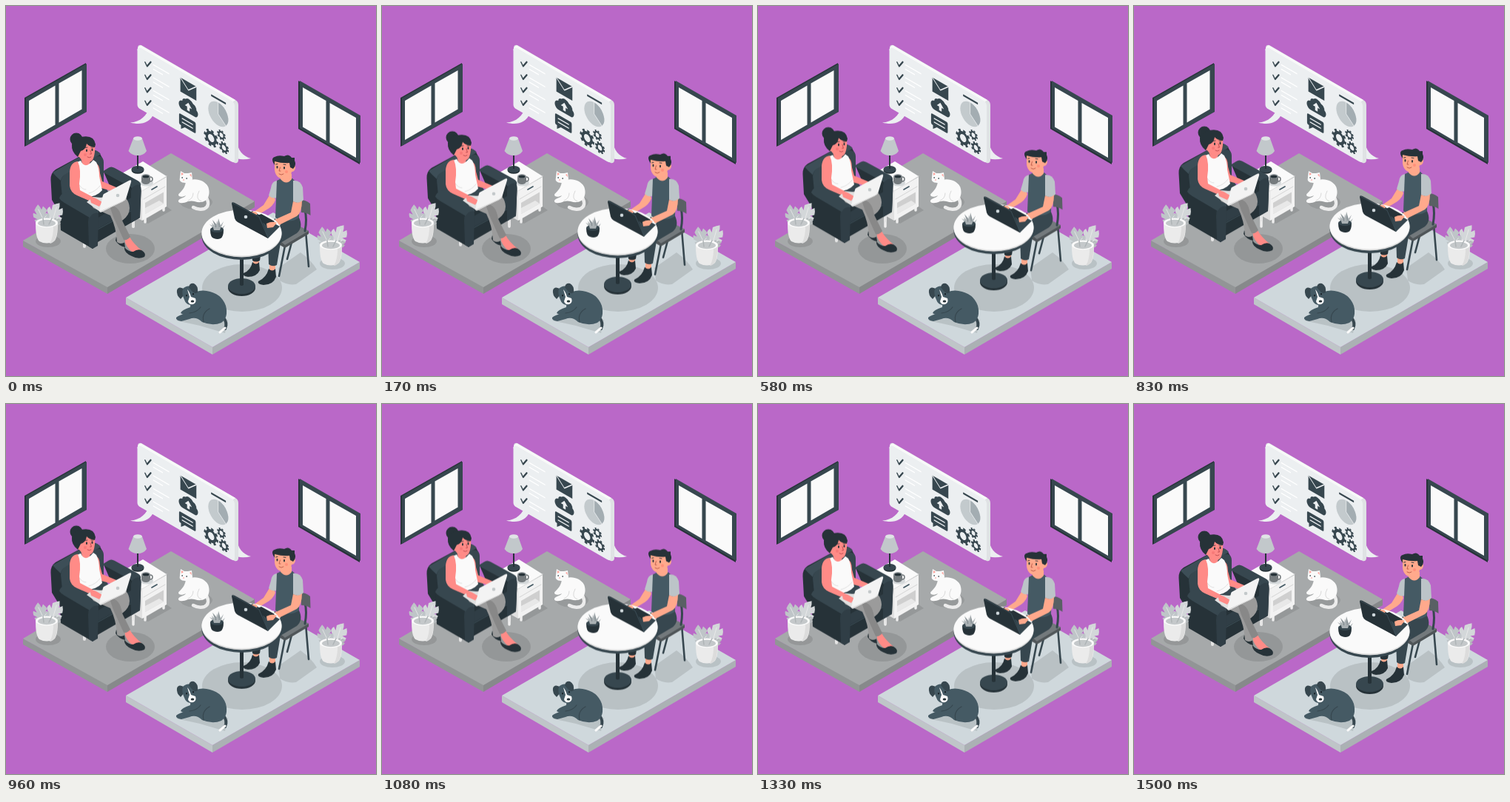
These frames come from a looping animation (500x500 px, 1540 ms). An HTML page without scripts:

```html
<!DOCTYPE html>
<html lang="en">
<head>
<meta charset="utf-8">
<title>Working from home</title>
<style>
html, body { margin: 0; width: 100%; height: 100%; overflow: hidden; background: #ba68c8; }
svg { display: block; width: 100vw; height: 100vh; }
.float { animation: float 1.54s linear infinite; }
/* 1.5 s up and down, then a 40 ms rest */
@keyframes float {
  0%, 97.4%, 100% { transform: none; }
  48.7% { transform: translateY(-10px); }
}
.ink { fill: #263238; }
.dark { fill: #37474f; }
.slate { fill: #455a64; }
.white { fill: #fafafa; }
.pale { fill: #ebebeb; }
.grey { fill: #e0e0e0; }
.panel { fill: #eceff1; }
.rose { fill: #ff8b87; }
.peach { fill: #ffa98c; }
.line { fill: none; stroke-linecap: round; stroke-linejoin: round; }
</style>
</head>
<body>
<svg viewBox="0 0 500 500">
<defs>
  <g id="gear">
    <circle r="6.800" fill="none" stroke="#37474f" stroke-width="3.800"/>
    <circle r="9.500" fill="none" stroke="#37474f" stroke-width="3.600" pathLength="16" stroke-dasharray="1"/>
  </g>
  <g id="item">
    <path class="line" d="M0 0 3 4 9 -5" stroke="#37474f" stroke-width="1.900"/>
    <path class="line" d="M13 -3H37M13 3H27" stroke="#fff" stroke-width="1.600"/>
  </g>
  <g id="leaf">
    <path d="M0 0C-8 0 -13 -6 -12 -12L-8 -11 -12 -16Q-12 -20 -10 -22L-6 -18 -7 -25Q-3 -29 1 -31 3 -27 3 -22L7 -26Q10 -21 10 -17L5 -14 11 -13Q11 -4 0 0Z"/>
    <path class="line" d="M0 2Q0 -12 -1 -24M0 -8 6 -11M0 -7 -7 -9" stroke="#eee" stroke-width=".7"/>
  </g>
  <g id="plant">
    <ellipse cx="2" cy="27" rx="17" ry="8" fill="#000" opacity=".1"/>
    <use href="#leaf" transform="translate(6 4) rotate(20)" fill="#d3d7d9"/>
    <use href="#leaf" transform="translate(-2 4) rotate(-22) scale(.92)" fill="#bfc5c8"/>
    <use href="#leaf" transform="translate(6 5) rotate(62) scale(.5)" fill="#b5babc"/>
    <path class="pale" d="M-15 2C-15 14 -14 23 -10 27Q0 32 10 27C14 23 15 14 15 2Z"/>
    <path d="M4 30Q13 29 14 12L15 2H9Q10 20 4 30Z" fill="#dcdcdc"/>
    <ellipse class="white" cy="2" rx="15" ry="6.500"/>
    <ellipse cy="2.500" rx="12" ry="4.700" fill="#c4c8ca"/>
    <path class="line" d="M-4 4-5 -4M3 4 7 -4" stroke="#aeb4b6" stroke-width="1.500"/>
  </g>
</defs>

<rect width="500" height="500" fill="#ba68c8"/>

<g id="floors">
  <path d="M23 317 137 379V389L23 325Z" fill="#929596"/>
  <path d="M137 379 336 263V272L137 389Z" fill="#87898b"/>
  <path d="M223 199 336 264 137 380 23 317Z" fill="#a6a9aa"/>
  <path d="M162 394 279 461V471L162 403Z" fill="#bfc5c8"/>
  <path d="M279 461 478 346V355L279 471Z" fill="#abb1b4"/>
  <path d="M361 279 478 346 279 461 162 394Z" fill="#cfd8dc"/>
  <g fill="#000" opacity=".1">
    <ellipse cx="168" cy="328" rx="33" ry="20"/>
    <ellipse cx="319" cy="381" rx="54" ry="32"/>
    <path d="M368 354 398 333Q413 344 420 356L392 376Q380 378 370 371Z"/>
  </g>
</g>

<g id="windows">
  <path class="ink" d="M25 124 108 77V143L25 190Z"/>
  <path class="dark" d="M27 124.500 109 78V143L27 189Z"/>
  <path class="white" d="M31 128 66.500 107.500V160.500L31 181ZM71.500 104.500 102.500 87V139.500L71.500 157.500Z"/>
  <path class="ink" d="M395 101 478 149V214L395 166Z"/>
  <path class="dark" d="M397 101 479 148V212L397 165Z"/>
  <path class="white" d="M401 110 432.500 128V182L401 163.500ZM437.500 131 473 151V205L437.500 184.500Z"/>
</g>

<g id="bubble">
  <path class="panel" d="M194 136C191 148 181 157 168 157.500 181 161 194 159 200 145ZM312 182C313 195 320 203 331 206 322 208 312 208 306 203Z"/>
  <path d="M178 57Q178 52 183 53L310 127Q314 129 314 134V209Q313 213 309 212L180 138Z" fill="#dfe2e4"/>
  <path d="M177.500 60Q177.500 55 182 53L310 127 306 130 182 57Z" fill="#f8f9f9"/>
  <path class="panel" d="M177.500 60Q177.500 55 182 57L305 128Q309 131 309 135V208Q309 213 304 210L181 139Q177.500 137 177.500 133Z"/>
  <g transform="matrix(.866 .5 0 1 188 76)">
    <use href="#item"/>
    <use href="#item" y="17.500"/>
    <use href="#item" y="35"/>
    <use href="#item" y="52.500"/>
    <g transform="translate(55 -7)">
      <path class="dark" d="M0 0H25V19H0Z"/>
      <path class="line" d="M0 0 12.500 11 25 0" stroke="#eceff1" stroke-width="1.300"/>
      <path class="dark" d="M4 42A6 6 0 0 1 3 30 5 5 0 0 1 8 25 8 8 0 0 1 20 26 6 6 0 0 1 25 32 5.500 5.500 0 0 1 21 42Z"/>
      <path class="panel" d="M12.500 28 18 34H14.500V39H10.500V34H7Z"/>
      <path class="dark" d="M-2 51Q-2 49 0 49H22Q24 49 24 51V62Q24 64 22 64H7L1 69V64Q-2 64 -2 62Z"/>
      <path class="line" d="M3 54H19M3 59H19" stroke="#eceff1" stroke-width="1.500"/>
    </g>
    <path d="M103 -7H126" stroke="#37474f" stroke-width="2.600"/>
    <circle cx="114" cy="13" r="15.500" fill="#c3cacd"/>
    <path d="M114 13V-2.500A15.500 15.500 0 0 1 126 23Z" fill="#a3adb2"/>
    <path class="line" d="M114 -2.500V13L126 23" stroke="#eceff1" stroke-width=".9"/>
    <use href="#gear" transform="translate(103 51)"/>
    <use href="#gear" transform="translate(119 39) scale(.6)"/>
    <use href="#gear" transform="translate(123 54) scale(.68)"/>
  </g>
</g>

<g id="nightstand">
  <path d="M184 291 217 271 224 276 192 294Z" fill="#000" opacity=".1"/>
  <path class="line" d="M188 287V292M213 272V276M172 290V298" stroke="#eee" stroke-width="3.500"/>
  <path class="grey" d="M150 230 184 250V290L150 271Z"/>
  <path d="M184 250 217 231V271L184 290Z" fill="#f2f2f2"/>
  <path d="M188 266 213 251.500V267L188 281Z" fill="#cfcfcf"/>
  <path d="M188 281 213 267 207 263 188 273Z" fill="#e8e8e8"/>
  <path class="line" d="M186 261 215 244" stroke="#d5d5d5"/>
  <path class="line" d="M197 248 204 244" stroke="#455a64" stroke-width="1.700"/>
  <path class="white" d="M150 230 185 210 217 230 184 250Z"/>
  <path class="line" d="M150 230 184 250 217 230" stroke="#e4e4e4"/>
  <ellipse cx="178" cy="222" rx="8.500" ry="4.800" class="ink"/>
  <ellipse cx="178" cy="220.500" rx="8.500" ry="4.500" class="dark"/>
  <path d="M178 195V220" stroke="#263238" stroke-width="2"/>
  <path d="M172 179 165.500 196Q170 202 178 202 186 202 190 196L184 179Z" fill="#c2c8cb"/>
  <ellipse cx="178" cy="179" rx="6" ry="2.800" fill="#e0e4e6"/>
  <ellipse cx="190" cy="239" rx="9" ry="4.500" fill="#d4d8da"/>
  <circle cx="195" cy="234" r="3" fill="none" stroke="#757b7e" stroke-width="1.500"/>
  <path d="M183 230V237Q184 241 189 241 194 241 195 237V230Z" fill="#757b7e"/>
  <ellipse cx="189" cy="230" rx="6" ry="3" fill="#9ba1a4"/>
  <ellipse cx="189" cy="230.500" rx="4.500" ry="2" class="ink"/>
</g>

<g id="cat">
  <ellipse cx="257" cy="265" rx="22" ry="10" fill="#000" opacity=".09"/>
  <path class="line" d="M270 257Q277 270 268 274 260 276 253 272" stroke="#ececec" stroke-width="4.500"/>
  <path class="white" d="M243 238C252 231 268 234 273 244 277 254 273 264 264 265 256 266 254 262 246 264 238 268 232 266 233 263 234 260 242 259 243 256 238 259 233 258 233 255 234 252 241 249 243 238Z"/>
  <path class="line" d="M264 264Q255 261 261 250M246 263Q253 260 253 253" stroke="#d9d9d9"/>
  <path class="white" d="M236 223 241 226H246L251 225 252 234Q249 241 242 239 233 239 235 231Z"/>
  <path d="M237 225 240 227 237 229ZM250 227 248 228 251 231Z" fill="#ff9e97"/>
  <path class="line" d="M238 232H238.300M244 233H244.300" stroke="#263238" stroke-width="1.500"/>
  <circle cx="240" cy="235" r=".8" class="rose"/>
</g>

<g class="float" id="lounge">
  <g id="armchair">
    <path class="line" d="M106 321V325M172 292V298" stroke="#e5e5e5" stroke-width="4"/>
    <path class="ink" d="M60.500 235Q60 226 67 221L113 196Q120 193 126 198L131 207V235L147 278 85 300 62 262Z"/>
    <path class="dark" d="M74 238Q74 230 82 226L118 205Q131 199 132 211V242L150 268 110 284 76 258Z"/>
    <path d="M63 225 113 196Q121 192 128 200 126 202 119 205L81 227Q75 230 74 236 67 230 63 225Z" fill="#3d4e57"/>
    <path class="ink" d="M132 224 178 243Q183 244 182.500 250L181 286 124 319 118 285 150 266Z"/>
    <path d="M123 287 169 259V276L124 301Z" fill="#303e46"/>
    <path class="line" d="M124 302 169 277" stroke="#455a64" stroke-width=".7"/>
    <path class="dark" d="M130 224 138 219Q142 216 147 219L178 236Q183 239 182 243L172 247Q169 245 165 243Z"/>
    <path d="M169 250Q170 244 176 242 183 240 182.500 248L181 286 169 293Z" fill="#303e46"/>
    <path class="ink" d="M72 260Q72 254 80 258L116 279Q123 283 124 323L117 328 74 303Z"/>
    <path d="M111 292Q111 281 118 278 125 275 125 283L124 324 117 328 112 325Z" fill="#303e46"/>
    <path class="dark" d="M72 260Q73 255 79 252 84 249 89 252L120 270Q126 274 125 280 118 278 113 286L79 266Q74 263 72 260Z"/>
  </g>
  <g id="woman">
    <path class="rose" d="M150 309 157 311 159 317 153 318ZM160 316 167 312Q172 321 183 330L171 333Q162 326 160 316Z"/>
    <path class="ink" d="M149 312Q154 319 160 319L161 326Q152 324 148 317ZM160 326Q165 332 172 332 178 328 183 330 190 334 187 339 179 343 170 338 159 333 160 326Z"/>
    <path d="M112 263 150 253Q166 257 167 273 167 283 157 290L161 319Q155 323 150 319 149 299 141 283L118 273Z" fill="#9b9b9b"/>
    <path d="M140 270Q154 269 157 290L168 312Q164 317 159 316L145 285Z" fill="#888"/>
    <path class="rose" d="M119 211Q127 213 127 226L130 237 149 245 147 251 125 245 117 222Z"/>
    <path class="rose" d="M100 201 114 207 113 214Q109 220 103 213Z"/>
    <path class="white" d="M96 211 101 209Q107 222 118 208L122 211Q126 219 126 230L130 249Q121 260 101 258Q96 244 94 222Z"/>
    <path class="line" d="M112 253Q121 251 127 243M108 248Q103 248 99 242" stroke="#e1e1e1"/>
    <path class="rose" d="M97 210Q87 211 86 224L86 243Q87 252 96 256L119 266Q126 270 131 270 131 264 123 261L100 249 99 240Q102 221 97 210Z"/>
    <path class="grey" d="M109 265 118 258 140 260 127 278Z"/>
    <path class="rose" d="M113 258Q119 258 125 262L130 265 126 271 115 266Z"/>
    <path d="M131 256Q131 254 134 253L166 236Q170 234 169 238L162 261Q161 263 158 264L128 279 126 277Z" fill="#f3f3f3"/>
    <path class="line" d="M127 278 158 264Q161 262 162 260" stroke="#d5d5d5"/>
    <circle cx="151" cy="256" r="2.300" fill="#c3c8ca"/>
    <circle class="ink" cx="95" cy="180" r="8.500"/>
    <path class="rose" d="M97 188 120 184Q121 198 118 206 116 211 111 211 102 209 99 204 93 203 94 198Z"/>
    <path class="ink" d="M97 204Q88 197 89 187 92 177 105 176.500 119 175 121 187L120 191Q112 190 109 186 108 194 101 196Z"/>
    <path class="line" d="M109 194.500V196M116.500 193.500V195" stroke="#263238" stroke-width="1.900"/>
    <path class="line" d="M106.500 191.500 110 191M115 191H118" stroke="#263238" stroke-width=".8"/>
    <path class="line" d="M114 195 115.500 200 113.500 200M110 204Q112.500 206 115 204" stroke="#b94a50" stroke-width=".9"/>
    <circle cx="107" cy="201" r="2" fill="#f0706f" opacity=".6"/>
  </g>
</g>

<use href="#plant" x="55" y="291"/>
<use href="#plant" x="439" y="321"/>

<g class="float" id="desk">
  <g id="chair">
    <path class="line" d="M388 312 380 342M405 304 409 352M377 324 369 365" stroke="#37474f" stroke-width="2.600"/>
    <path d="M366 315 396 298 409 304 409 308 377 327 365 320Z" fill="#4f5558"/>
    <path d="M366 314 396 297 409 304 377 323Z" fill="#73797c"/>
    <path class="line" d="M404 304Q407 288 404 276" stroke="#37474f" stroke-width="3"/>
    <path d="M398 262Q405 262 411 267L411.500 283Q406 279 399 279Z" fill="#596064"/>
  </g>
  <g id="man">
    <path class="peach" d="M334 340H342V352H334ZM356 345H364V362H356Z"/>
    <path class="ink" d="M333 346Q338 351 342 346L343 357Q339 366 327 366 319 365 321 361 331 357 333 346ZM355 355Q360 360 364 355L365 366Q361 377 348 377 339 376 341 372 352 367 355 355Z"/>
    <path class="ink" d="M364 287 345 300 331 312 333 344Q338 347 343 344L346 324 370 311Z"/>
    <path class="dark" d="M365 286 396 286Q402 299 393 307L371 320 366 350Q360 353 355 349L354 316Q354 309 361 304L371 296Z"/>
    <path class="peach" d="M359 251 364 262Q361 271 351 276L336 285 331 281 348 269Z"/>
    <path d="M366 236Q359 237 358 246L355 256Q360 261 366 259Z" fill="#bcc4c8"/>
    <path d="M366 236 372 233H387L392 238 397 250 396 286Q384 295 364 286Z" class="slate"/>
    <path class="peach" d="M371 227H386V234Q379 243 371 234Z"/>
    <path d="M388 236Q398 235 401 245L402 262Q396 269 388 264Z" fill="#bcc4c8"/>
    <path class="peach" d="M388 264Q396 268 400 263 400 279 393 284L363 299Q355 302 353 297L356 292 385 279Z"/>
    <path class="peach" d="M363 209 386 208 386 216Q391 213 391 219 390 224 386 224 385 234 376 234 364 233 363 221Z"/>
    <path class="ink" d="M363 215Q357 206 363 204 368 201 376 203 382 199 386 205L390 205 390 209Q393 215 388 220L384 218 383 212Q374 213 363 210Z"/>
    <path class="line" d="M366.500 217V218.500M376 218V219.500" stroke="#263238" stroke-width="1.900"/>
    <path class="line" d="M364.500 214 367 213.500M375 214 378 214.500" stroke="#263238" stroke-width=".9"/>
    <path class="line" d="M370.500 218 369 223H371M369 227Q372 229.500 375 227" stroke="#b85847" stroke-width=".9"/>
    <circle cx="379" cy="224" r="2" fill="#ff7f6e" opacity=".6"/>
  </g>
  <g id="table">
    <ellipse class="ink" cx="318.500" cy="381" rx="18.500" ry="11"/>
    <ellipse class="dark" cx="318.500" cy="378.500" rx="18.500" ry="10.500"/>
    <path class="ink" d="M316 335H321V377Q318.500 379 316 377Z"/>
    <path class="dark" d="M264.500 307A54 32 0 0 0 372.500 307V311A54 32 0 0 1 264.500 311Z"/>
    <ellipse cx="318.500" cy="308" rx="54" ry="31.500" fill="#dcdcdc"/>
    <ellipse class="white" cx="318.500" cy="306.500" rx="54" ry="31"/>
  </g>
  <g id="cactus">
    <g fill="#8f989c">
      <path d="M284 303 279 289 286 297 287 287 290 297 294 291 289 303Z"/>
      <path d="M283 303 275 295 282 298ZM288 303 296 296 292 303Z" fill="#aab1b4"/>
    </g>
    <path class="ink" d="M276 302Q276 313 281 314 286 316 290 314 294 312 294 302Z"/>
    <ellipse class="dark" cx="285" cy="302" rx="9" ry="4"/>
    <path d="M281 303 278 293 284 299 285 290 288 299 292 294 289 303Z" fill="#aab1b4"/>
  </g>
  <g id="laptop">
    <path class="dark" d="M312 288 333 277 370 298 354 314Z"/>
    <path d="M335 285 345 281 363 291 355 298Z" class="ink"/>
    <path class="peach" d="M331 279Q336 276 340 280L337 286 329 284ZM352 294Q360 290 366 293L361 299 353 300Z"/>
    <path class="ink" d="M305 267Q305 264 309 266L342 284Q344 285 345 288L354 314 313 292Q310 290 309 287Z"/>
    <path class="line" d="M306 266 342 285 354 313" stroke="#455a64" stroke-width=".7"/>
    <circle cx="324" cy="285" r="2.300" fill="#cfd8dc"/>
  </g>
</g>

<g id="dog">
  <path d="M230 425 262 421 300 424 296 442 262 432Z" fill="#000" opacity=".1"/>
  <path class="line" d="M293 420Q300 428 296 436" stroke="#37474f" stroke-width="4"/>
  <path class="line" d="M296 435 289 441" stroke="#fafafa" stroke-width="3"/>
  <path class="slate" d="M250 391Q258 383 271 385 291 388 297 405 301 421 291 428 279 433 265 427 257 419 248 423L237 426Q229 425 230 421 233 418 244 415 240 418 236 415 237 411 249 407Z"/>
  <path class="line" d="M267 427Q264 415 275 409M248 415Q258 414 263 407" stroke="#37474f" stroke-width="1.200"/>
  <path class="dark" d="M240 382Q233 378 231 384 230 391 236 396 241 391 242 385Z"/>
  <path class="slate" d="M239 382Q245 376 252 380 259 387 258 396 255 405 249 404 243 403 241 397 237 389 239 382Z"/>
  <path class="dark" d="M247 380Q248 374 254 375 260 378 259 387 255 390 251 385Z"/>
  <path class="white" d="M245 383Q248 386 250 393L256 395Q258 401 253 403 247 404 246 399L248 393Z"/>
  <ellipse class="ink" cx="252" cy="399" rx="2.300" ry="1.600"/>
  <path class="line" d="M244 391V391.500M253 389V389.500" stroke="#182126" stroke-width="2"/>
</g>
</svg>
</body>
</html>
```
